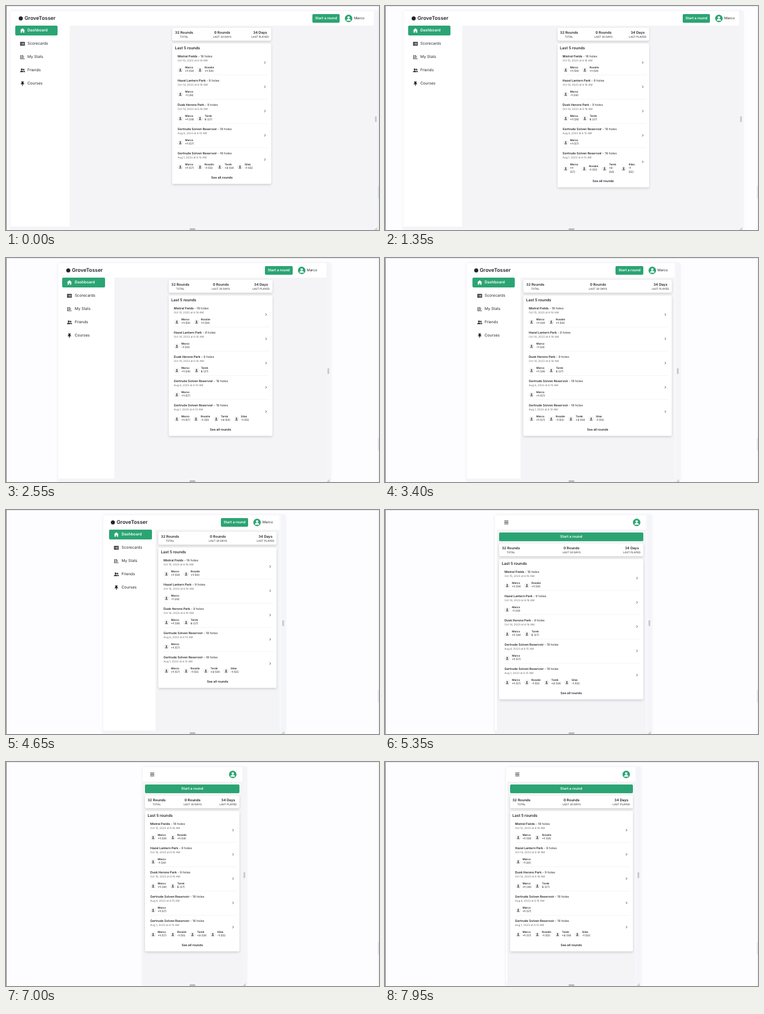
An HTML page that plays this animation: 644 by 388 pixels, repeating every 8 s.

```html
<!DOCTYPE html>
<html lang="en">
<head>
<meta charset="utf-8">
<title>Responsive dashboard</title>
<style>
@property --half { syntax: "<length>"; inherits: true; initial-value: 313.5px; }
@property --inset { syntax: "<length>"; inherits: true; initial-value: 0px; }
@property --lag { syntax: "<length>"; inherits: true; initial-value: 0px; }

* { box-sizing: border-box; }
html, body { margin: 0; width: 100%; height: 100%; overflow: hidden; }
body {
  --green: #2ba473;
  --ink: #242428;
  position: relative;
  background: #fdfdff;
  color: var(--ink);
  font: 6.05px/7px Inter, "Open Sans", sans-serif;
  text-rendering: geometricPrecision;
  white-space: nowrap;
  animation: drag 8s linear infinite;
}
b { font-weight: 600; }
svg { display: block; }

/* Half the viewport width while the handle is dragged in and out */
@keyframes drag {
  0%, 1.875% { --half: 313.5px; }
  12.5%, 13.125% { --half: 299.5px; --lag: 0px; }
  16.875% { --half: 289.5px; --lag: 9px; }
  23.75%, 24.375% { --half: 270.5px; --lag: 0px; }
  31.875% { --half: 232px; }
  33.75%, 34.375% { --half: 209.5px; }
  38.125%, 39.375% { --half: 199.5px; --inset: 0px; }
  42.5% { --half: 181px; --inset: 2.5px; }
  46.25%, 47.5% { --half: 170.5px; }
  58.125% { --half: 153.5px; }
  68.75%, 69.375% { --half: 126.5px; --inset: 2.5px; }
  75.625%, 76.875% { --half: 100.5px; --inset: 0px; }
  78.75%, 80.625% { --half: 92.5px; }
  87.5%, 89.375% { --half: 86px; }
  92.5%, 93.75% { --half: 94.5px; --inset: 0px; }
  99.375%, 100% { --half: 112.5px; --inset: 2px; }
}

.edge { position: absolute; }
.edge.left { left: 0; top: 0; width: 1px; height: 100%; background: #77777c; }
.edge.top { left: 0; top: 0; width: 100%; height: 1px; background: #dfe3ee; }
.edge.right { right: 0; top: 0; width: 2px; height: 100%; background: #f3f4f9; }
.edge.thumb { right: 0; top: 312px; width: 2px; height: 21px; background: #dfe3ec; }

.shell {
  position: absolute;
  left: calc(321.5px - var(--half));
  top: 9px;
  width: calc(2 * var(--half) + 7px);
  bottom: 0;
  background: #f4f5f9;
  box-shadow: 0 0 4px rgba(60, 60, 90, .1);
}
.view {
  position: absolute;
  left: 0; top: 0; right: 7px; bottom: 6px;
  overflow: hidden;
  background: linear-gradient(90deg, #fff 50%, #f8f8fc 50%);
}
.app {
  position: absolute;
  left: var(--inset);
  top: 0;
  width: calc(2 * var(--half) - 2 * var(--inset) + var(--lag));
  height: 100%;
  container-type: inline-size;
}
.grip { position: absolute; background: #bcbcc2; border-radius: 1px; }
.grip.side { right: 2px; top: 182px; width: 3px; height: 10px; background: #c9c9ce; }
.grip.base { left: 316.5px; bottom: 0; width: 10px; height: 3px; }
.corner { position: absolute; right: 1px; bottom: 0; }

header {
  display: flex;
  align-items: center;
  height: 25px;
  padding: 0 16px 0 14px;
  background: #fff;
}
.mark { width: 7px; height: 7px; margin-right: 3px; border-radius: 50%; background: var(--ink); }
.brand { font-size: 8.8px; font-weight: 600; }
.space { flex: 1; }
.start {
  display: flex;
  align-items: center;
  justify-content: center;
  width: 47.5px;
  height: 15.5px;
  border-radius: 2px;
  background: var(--green);
  color: #fff;
  font-weight: 600;
}
header .start { margin-right: 9px; }
.face { width: 13px; height: 13px; border-radius: 50%; background: var(--green); color: #fff; }
.user { margin-left: 2.5px; }
.menu, main .start { display: none; }

.body { display: flex; height: calc(100% - 25px); background: #f4f4f6; }
nav {
  flex: none;
  width: min(67px + 6.8cqw, 84px + 2.95cqw);
  padding-left: 7.5px;
  background: #fff;
}
.link {
  display: flex;
  align-items: center;
  width: 73.5px;
  height: 17px;
  margin-bottom: 6px;
  padding-left: 8px;
  border-radius: 2px;
  font-size: 6.6px;
}
.link svg { margin-right: 4.5px; }
.link.on { background: var(--green); color: #fff; font-weight: 600; }

main { flex: 1; min-width: 0; padding-top: 4px; }
.col { width: calc((100% - 12px) / 3); margin: 0 auto; }
.card {
  border-radius: 2px;
  background: #fff;
  box-shadow: 0 2px 4px rgba(0, 0, 0, .14), 0 0 1px rgba(0, 0, 0, .06);
}
.stats {
  display: flex;
  justify-content: space-between;
  height: 22px;
  margin-bottom: 5px;
  padding: 5px 4.5px 0;
  text-align: center;
}
.stats b, .stats span { display: block; }
.stats span { margin-top: 1px; font-size: 4.5px; }
.head { height: 13px; padding-left: 4.5px; font-size: 6.6px; font-weight: 600; line-height: 16px; }
.round {
  position: relative;
  margin: 0 5px 0 9px;
  padding: 7px 17px 1.4px 0;
  border-bottom: 1px solid #f5f5f7;
  font-size: 5.3px;
}
.round:nth-last-child(2) { border-color: transparent; }
.date { color: #66666c; font-size: 4.6px; }
.chev { position: absolute; right: 4px; top: calc(50% - 3px); }
.players { display: flex; gap: 5.5px; margin-top: 6px; font-size: 4.6px; line-height: 6.3px; }
.player { display: flex; align-items: center; gap: 3px; white-space: normal; }
.player svg { flex: none; border-radius: 50%; background: #f3f3f5; color: #4a4a50; }
.player b.name { display: block; }
.all { height: 20px; font-size: 5.4px; font-weight: 600; line-height: 20px; text-align: center; }

@container (max-width: 499px) {
  .col { width: calc((100% - 8px) / 2); }
}
@container (max-width: 387px) {
  header { padding: 0 11.5px 0 10.5px; }
  .col { width: calc(100% - 10px); }
}
@container (max-width: 297px) {
  header { padding: 0 9.5px 0 13.5px; }
  nav, .mark, .brand, .user, header .start { display: none; }
  .menu { display: block; }
  .col { width: calc(100% - 9px); }
  main .start { display: flex; width: 100%; margin: .5px 0 4px; }
}
</style>
</head>
<body>
<div class="edge right"></div>
<div class="edge thumb"></div>
<div class="edge top"></div>
<div class="shell">
  <div class="view">
    <div class="app">
      <header>
        <svg class="menu" width="7" height="7" viewBox="0 0 7 7" stroke="#242428"><path d="M0 1h7M0 3.5h7M0 6h7"/></svg>
        <i class="mark"></i><span class="brand">GroveTosser</span>
        <span class="space"></span>
        <span class="start">Start a round</span>
        <svg class="face" viewBox="0 0 10 10" fill="currentColor"><circle cx="5" cy="3.7" r="1.6"/><path d="M2.1 8a2.9 2.4 0 0 1 5.8 0z"/></svg>
        <span class="user">Marco</span>
      </header>
      <div class="body">
        <nav id="nav"></nav>
        <main>
          <div class="col">
            <span class="start">Start a round</span>
            <div class="card stats" id="stats"></div>
            <div class="card" id="rounds"></div>
          </div>
        </main>
      </div>
    </div>
  </div>
  <i class="grip side"></i>
  <svg class="corner" width="5" height="5" viewBox="0 0 5 5" stroke="#85858c" stroke-width=".7"><path d="M.5 5L5 .5M2.8 5L5 2.8"/></svg>
</div>
<i class="grip base"></i>
<div class="edge left"></div>

<script>
const links = [
  ["Dashboard", '<path d="M4.5 .5L.3 4.3h1.1v3.9h2.2V5.5h1.8v2.7h2.2V4.3h1.1z"/>'],
  ["Scorecards", '<path fill-rule="evenodd" d="M.5 1.3h8v6.4h-8zM1.7 2.7v.8h1v-.8zM3.5 2.7v.8h3.9v-.8zM1.7 4.2v.8h1v-.8zM3.5 4.2v.8h3.9v-.8zM1.7 5.7v.8h1v-.8zM3.5 5.7v.8h3.9v-.8z"/>'],
  ["My Stats", '<path d="M.9 1h.9v6.2h6.5v.9H.9zM2.7 1.6h3.2v.9H2.7zM2.7 3.4h4.6v.9H2.7zM2.7 5.2h3.9v.9H2.7z"/>'],
  ["Friends", '<circle cx="3.2" cy="2.8" r="1.6"/><circle cx="6.5" cy="3" r="1.3"/><path d="M.2 7.6c0-3.4 6-3.4 6 0zM6.8 7.6c0-1.2-.4-1.9-1-2.4 1.7-.5 3.1.5 3.1 2.4z"/>'],
  ["Courses", '<path d="M2.3 .7h4.4v1H6l.3 2.1c.8.4 1.2 1 1.2 1.7H5v2.2l-.5 1-.5-1V5.5H1.5c0-.7.4-1.3 1.2-1.7L3 1.7h-.7z"/>']
];
const stats = [["32 Rounds", "TOTAL"], ["0 Rounds", "LAST 30 DAYS"], ["34 Days", "LAST PLAYED"]];
const lake = "Gertrude Solven Reservoir";
const rounds = [
  ["Mistral Fields", 18, "Oct 15, 2023 at 6:16 AM", "Marco +1 59", "Rosalie +1 59"],
  ["Hazel Lantern Park", 9, "Oct 14, 2023 at 6:16 AM", "Marco -1 26"],
  ["Dusk Herons Park", 9, "Oct 14, 2023 at 6:16 AM", "Marco +1 28", "Tarek E 27"],
  [lake, 18, "Aug 6, 2023 at 6:15 AM", "Marco +1 57"],
  [lake, 18, "Aug 1, 2023 at 6:13 AM", "Marco +1 57", "Rosalie -1 55", "Tarek +3 59", "Silas -1 55"]
];

const fill = (id, html) => { document.getElementById(id).innerHTML = html; };
const each = (list, fn) => list.map(fn).join("");

const person = '<svg width="10" height="10" viewBox="0 0 10 10" fill="currentColor">' +
  '<circle cx="5" cy="3.8" r="1.2"/><path d="M2.8 7.3a2.2 1.9 0 0 1 4.4 0z"/></svg>';
const chevron = '<svg class="chev" width="4" height="6" viewBox="0 0 4 6" fill="none" ' +
  'stroke="#45454b" stroke-width=".8"><path d="M1 1l2 2-2 2"/></svg>';

function player(text) {
  const [name, par, score] = text.split(" ");
  return `<div class="player">${person}<div><b class="name">${name}</b><b>${par}</b> (${score})</div></div>`;
}

fill("nav", each(links, ([label, icon], i) =>
  `<div class="link${i ? "" : " on"}"><svg width="9" height="9" viewBox="0 0 9 9" fill="currentColor">${icon}</svg>${label}</div>`));

fill("stats", each(stats, ([value, label]) => `<div><b>${value}</b><span>${label}</span></div>`));

fill("rounds", '<div class="head">Last 5 rounds</div>' +
  each(rounds, ([place, holes, date, ...people]) =>
    `<div class="round"><div><b>${place}</b> - ${holes} holes</div><div class="date">${date}</div>` +
    `<div class="players">${each(people, player)}</div>${chevron}</div>`) +
  '<div class="all">See all rounds</div>');
</script>
</body>
</html>
```
